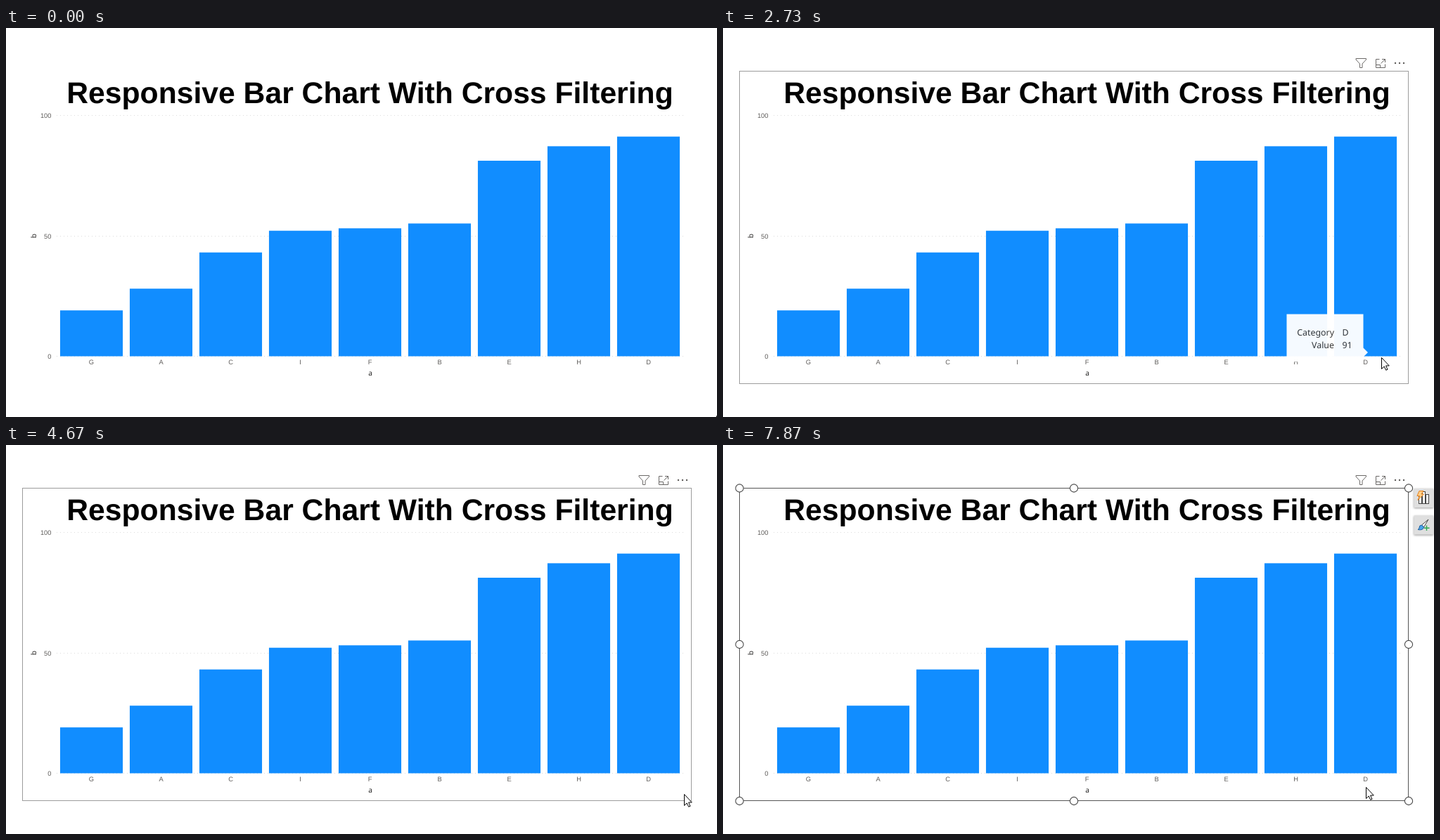
Recreate the animation shown at these times as an HTML page. Size 1011 by 554 pixels, loop 8000 ms.

```html
<!DOCTYPE html>
<html lang="en">
<head>
<meta charset="utf-8">
<title>Responsive bar chart</title>
<style>
  html, body { margin: 0; width: 100%; height: 100%; overflow: hidden; background: #fff; }
  svg { display: block; width: 100vw; height: 100vh; }
  text { font-family: "Liberation Sans", Arial, sans-serif; text-rendering: geometricPrecision; }
  .title { font-size: 42.667px; font-weight: 700; text-anchor: middle; }
  .label { font-size: 9.333px; fill: #605e5c; }
  .axis { font: 10.2px "Noto Sans", "Open Sans", sans-serif; fill: #252423; text-anchor: middle; }
  .tip text { font: 12.4px "Noto Sans", "Open Sans", sans-serif; fill: #333; }
  .mid { text-anchor: middle; }
  .end { text-anchor: end; }
  .grid { stroke: #dcdcdc; stroke-dasharray: 1 4; }
  .icon { fill: none; stroke: #6b6967; }
  .handle { fill: #fff; stroke: #4a4a4a; stroke-width: 1.1; }
  .button { fill: #dfdfdf; filter: drop-shadow(0 1px 1.5px #0006); }
  .pointer { fill: #fff; stroke: #000; stroke-width: 1; }
</style>
</head>
<body>
<svg id="stage" viewBox="0 0 1011 554">
  <rect width="1011" height="554" fill="#fff"/>
  <g id="chart">
    <text class="title" x="517.5" y="107">Responsive Bar Chart With Cross Filtering</text>
    <text class="axis" x="518" y="494.5">a</text>
    <text class="axis" transform="translate(42.5 296) rotate(-90)">b</text>
  </g>

  <g id="hover">
    <rect id="frame" x="23.5" y="61.5" width="951" height="445" fill="none"/>
    <g class="icon">
      <path d="M900 43.5H914.5V45L909 51V56.5H905.5V51L900 45Z"/>
      <path d="M933.5 44.5H928.5V56.5H941.5V51.5M928.5 52.5H934.5V56.5M935.5 50.5L941.5 44.5M937 44.5H941.5V49"/>
    </g>
    <g fill="#605e5c">
      <circle cx="956" cy="50" r="1.2"/>
      <circle cx="962" cy="50" r="1.2"/>
      <circle cx="968" cy="50" r="1.2"/>
    </g>
  </g>

  <g id="selection">
    <rect class="button" x="982.5" y="62" width="27.5" height="27"/>
    <g fill="#fff" stroke="#444">
      <rect x="989.5" y="73.5" width="4" height="10"/>
      <rect x="994.5" y="66.5" width="4" height="17"/>
      <rect x="999.5" y="70.5" width="4" height="13"/>
    </g>
    <path d="M990 65.5H996L993 70H996.5L988 78.5L990.5 72.5H987Z" fill="#ffd08a" stroke="#e8811a"/>
    <rect class="button" x="982.5" y="100.5" width="27.5" height="27"/>
    <path d="M1003 106L993.5 114L996.5 117Z" fill="#fff" stroke="#444"/>
    <path d="M993.5 114Q990 114 990 118Q989.5 120 988 120.5Q995.5 122 996.5 117Z" fill="#4ba3ea" stroke="#1c5f9e"/>
    <path d="M1000.5 114.5V122M996.8 118.3H1004.5" stroke="#2fa84f" stroke-width="1.4"/>
  </g>

  <g id="tip" class="tip">
    <path d="M0 0H109V48L115.5 54.5L109 61V68H0Z" fill="#fff"/>
    <text class="end" x="67.5" y="30">Category</text>
    <text class="end" x="67.5" y="48.7">Value</text>
    <text id="tipName" x="79" y="30"></text>
    <text id="tipValue" x="79" y="48.7"></text>
  </g>

  <path id="arrow" class="pointer" d="M.5 .5V16.5L4.2 13L6.7 18.3L9 17.3L6.6 12H11.3Z"/>
  <path id="resize" class="pointer" d="M-8 -8H-2L-4 -5.7L5.7 4L8 2V8H2L4 5.7L-5.7 -4L-8 -2Z"/>
</svg>
<script>
  const $ = id => document.getElementById(id);
  const LOOP = 8000, TICK = 1000 / 15;
  const BASE = 467.5, UNIT = 3.438, LEFT = 76.95, STEP = 99, BAR = STEP * 0.9;
  const data = { G: 19, A: 28, C: 43, I: 52, F: 53, B: 55, E: 81, H: 87, D: 91 };

  // Pointer route: tick, x, y
  const route = [
    [2, 1010, 552], [4, 968, 522], [6, 885, 466], [8, 792, 418], [10, 738, 393], [12, 722, 386],
    [30, 723, 386], [31, 772, 404], [32, 826, 423], [33, 853, 434], [35, 893, 450],
    [38, 926, 463], [40, 937, 468], [41, 936, 469], [43, 936, 469], [45, 943, 452],
    [61, 943, 452], [62, 949, 462], [64, 961, 489], [68, 961, 495],
    [69, 961, 495], [73, 972, 502], [107, 972, 502], [109, 965, 500], [113, 936, 494], [118, 914, 487]
  ];
  // Tooltip spans: shown from, last tick inside the bar, fade start
  const spans = [{ from: 18, hold: 40, fade: 41 }, { from: 52, hold: 62, fade: 64 }];
  const fades = [0.96, 0.75, 0.45, 0.15];

  function add(parent, tag, attrs, text = "") {
    const el = document.createElementNS("http://www.w3.org/2000/svg", tag);
    for (const key in attrs) el.setAttribute(key, attrs[key]);
    el.textContent = text;
    parent.append(el);
  }

  function build() {
    const chart = $("chart");
    for (const v of [0, 50, 100]) {
      const y = Math.ceil(BASE - v * UNIT - 0.5) + 0.5;
      add(chart, "line", { class: "grid", x1: 72, x2: 964, y1: y, y2: y });
      add(chart, "text", { class: "label end", x: 64.5, y: y + 3.2 }, v);
    }
    Object.entries(data).forEach(([name, v], i) => {
      const x = LEFT + i * STEP;
      add(chart, "rect", { x, y: BASE - v * UNIT, width: BAR, height: v * UNIT, fill: "#118dff" });
      add(chart, "text", { class: "label mid", x: x + BAR / 2, y: 479 }, name);
    });
    for (const x of [23.5, 499, 975])
      for (const y of [61.5, 284, 507])
        if (x !== 499 || y !== 284) add($("selection"), "circle", { class: "handle", cx: x, cy: y, r: 5.6 });
  }

  function pointerAt(tick) {
    const i = route.findIndex(p => p[0] >= tick);
    if (i < 0) return route[route.length - 1].slice(1);
    if (i === 0) return route[0].slice(1);
    const [t0, x0, y0] = route[i - 1], [t1, x1, y1] = route[i];
    const k = (tick - t0) / (t1 - t0);
    return [Math.round(x0 + (x1 - x0) * k), Math.round(y0 + (y1 - y0) * k)];
  }

  const show = (id, on) => $(id).style.display = on ? "" : "none";
  const place = (id, x, y) => $(id).setAttribute("transform", `translate(${x} ${y})`);

  function drawTip(tick) {
    const span = spans.find(s => tick >= s.from && tick < s.fade + fades.length);
    show("tip", span);
    if (!span) return;
    const [x, y] = pointerAt(Math.min(tick - 1, span.hold));
    const name = x < 765 ? "E" : x < 864 ? "H" : "D";
    $("tipName").textContent = name;
    $("tipValue").textContent = data[name];
    $("tip").style.opacity = tick < span.fade ? 1 : fades[tick - span.fade];
    place("tip", x - 135.5, y - 60.5);
  }

  function draw(ms) {
    const tick = Math.floor(ms / TICK + 0.1);
    const selected = tick >= 86;
    const sizing = selected && tick < 109;
    const [x, y] = pointerAt(tick);
    show("hover", tick >= 5);
    show("selection", selected);
    $("frame").setAttribute("stroke", selected ? "#555" : "#9c9c9c");
    drawTip(tick);
    show("arrow", !sizing);
    show("resize", sizing);
    place("arrow", x, y);
    place("resize", x + 0.5, y + 1);
  }

  build();
  const start = performance.now();
  function loop() {
    draw((performance.now() - start) % LOOP);
    requestAnimationFrame(loop);
  }
  loop();
</script>
</body>
</html>
```
